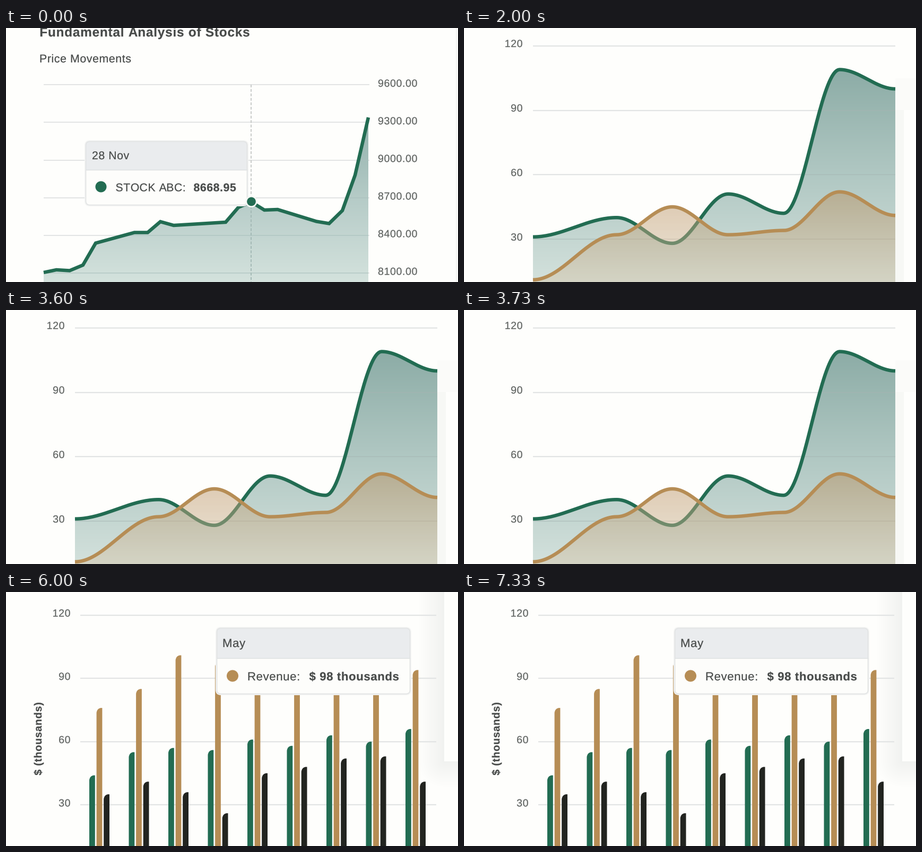
Animation, 852 px wide and 480 px high, one loop 8 s. Source, as a matplotlib script:

```python
import matplotlib.pyplot as plt
import numpy as np
from matplotlib.animation import FuncAnimation
from matplotlib.colors import to_rgba
from matplotlib.patches import Circle, FancyBboxPatch, PathPatch, Polygon, Rectangle
from matplotlib.path import Path
from matplotlib.textpath import TextPath

W, H = 852, 480
PT = 0.72  # points per pixel at 100 dpi
SCENE_MS, STEP_MS = 2000, 100

BG, GRID, HEAD, EDGE = "#fefefc", "#e2e4e4", "#eaecee", "#e1e3e3"
GREEN, BROWN, BLACK, BAR = "#226c52", "#b68d55", "#222420", "#43846a"
INK, LABEL = "#484b4a", "#606462"

fig = plt.figure(figsize=(W / 100, H / 100), dpi=100, facecolor=BG)


def stage():
    ax = fig.add_axes([0, 0, 1, 1])
    ax.set(xlim=(0, W), ylim=(H, 0))
    ax.set_autoscale_on(False)
    ax.axis("off")
    return ax


def rect(ax, x0, y0, x1, y1, color, z=1):
    ax.add_patch(Rectangle((x0, y0), x1 - x0, y1 - y0, fc=color, lw=0, zorder=z))


def dot(ax, x, y, r, color, z=9):
    ax.add_patch(Circle((x, y), r, fc=color, lw=0, zorder=z))


def line(ax, xs, ys, color, width, z=1, **kw):
    return ax.plot(xs, ys, color=color, lw=width * PT, zorder=z,
                   solid_capstyle="butt", **kw)[0]


def text(ax, x, y, s, size, color=INK, bold=False, right=False, up=False,
         track=0.6, z=10):
    """Letter-spaced text as outlines, anchored on its baseline."""
    prop = dict(family="Liberation Sans", weight="bold" if bold else "normal")

    def end(t):
        return TextPath((0, 0), t + "|", size=size, prop=prop).get_extents().x1

    zero = end("")
    if right:
        x -= end(s) - zero + track * (len(s) - 1)
    verts, codes = [], []
    for i, ch in enumerate(s):
        if ch == " ":
            continue
        glyph = TextPath((0, 0), ch, size=size, prop=prop)
        verts.append(glyph.vertices + [end(s[:i]) - zero + track * i, 0])
        codes.append(glyph.codes)
    v = np.concatenate(verts)
    if up:
        v = np.column_stack([x - v[:, 1], y - v[:, 0]])
    else:
        v = np.column_stack([x + v[:, 0], y - v[:, 1]])
    # a hairline gives the weight of hinted screen type
    ax.add_patch(PathPatch(Path(v, np.concatenate(codes)), fc=color, ec=color,
                           lw=0.25 * PT, zorder=z))


def clip_shape(ax, verts):
    return Polygon(verts, closed=True, transform=ax.transData)


def gradient(ax, verts, stops, z):
    """Fill a polygon with a vertical gradient; stops are (y, colour)."""
    ys = [y for y, _ in stops]
    rgba = np.array([to_rgba(c) for _, c in stops])
    rows = np.arange(H) + 0.5
    col = np.stack([np.interp(rows, ys, rgba[:, k]) for k in range(4)], axis=1)
    im = ax.imshow(col[:, None, :], extent=(0, W, H, 0), aspect="auto",
                   interpolation="nearest", zorder=z)
    im.set_clip_path(clip_shape(ax, verts))


def area(xs, ys):
    return np.column_stack([np.r_[xs, xs[-1], xs[0]], np.r_[ys, H + 9, H + 9]])


def tooltip(ax, x0, y0, x1, y1, split, title, name, value, color,
            size, xs, bases, spot):
    def box(grow, fc, ec, lw, z, alpha=None):
        patch = FancyBboxPatch((x0 + 8, y0 + 8), x1 - x0 - 16, y1 - y0 - 16,
                               boxstyle=f"round,pad={8 + grow}", fc=fc, ec=ec,
                               lw=lw * PT, zorder=z, alpha=alpha)
        return ax.add_patch(patch)

    box(2, "#f3f4f3", "none", 0, 6)
    body = box(0, BG, "none", 0, 6.1, 0.96)
    top = Rectangle((x0, y0), x1 - x0, split - y0, fc=HEAD, lw=0, zorder=6.2)
    ax.add_patch(top)
    top.set_clip_path(body)
    line(ax, [x0, x1], [split, split], "#dcdfe0", 1.3, 6.3)
    box(-0.5, "none", EDGE, 1.6, 6.4)
    text(ax, xs[0], bases[0], title, size)
    dot(ax, *spot, color)
    text(ax, xs[1], bases[1], name, size)
    text(ax, xs[2], bases[1], value, size, bold=True)


def price_scene():
    ax = stage()
    text(ax, 63.3, 16, "Fundamental Analysis of Stocks", 24.3, bold=True, track=0.8)
    text(ax, 63, 65, "Price Movements", 21.3)
    rect(ax, 847.5, 0, 849.5, H, "#f3f4f2")

    pts = [(71, 462), (95, 457), (120, 458.5), (145, 448), (169, 406.5),
           (242, 386.5), (267, 386.5), (291, 366), (316, 373), (414, 367),
           (438, 339), (462, 328.5), (487, 344), (512, 343), (585, 365.5),
           (609, 369.5), (634, 345), (658, 278), (683, 169)]
    xs, ys = np.array(pts).T
    fill = area(xs, ys)
    gradient(ax, fill, [(168, "#90b0ab"), (320, "#b5cbc7"), (480, "#d4e2dd")], 2)
    for i in range(6):
        y = 107 + 71.25 * i
        line(ax, [71, 685], [y, y], GRID, 2)
        inner = line(ax, [71, 683], [y, y], "#a9bfbc", 1.8, 3, alpha=0.6)
        inner.set_clip_path(clip_shape(ax, fill))
        text(ax, 701, 111 + 71.1 * i, f"{9600 - 300 * i}.00", 19.6, LABEL)
    dash = dict(dashes=(2.6, 1.6), dash_capstyle="butt")
    line(ax, [461.5, 461.5], [107, 328], "#c8cbc8", 2, 1, **dash)
    line(ax, [461.5, 461.5], [328, H], "#a3b9b5", 2, 3, **dash)
    line(ax, xs, ys, GREEN, 6.5, 4, solid_joinstyle="miter")

    tooltip(ax, 150, 214, 455, 335, 268, "28 Nov", "STOCK ABC:", "8668.95",
            GREEN, 21.2, (162, 206.5, 353.5), (248, 308.5), (179, 300, 10.5))
    dot(ax, 462.5, 328, 11, "#f6f8f5")
    dot(ax, 462.5, 328, 8.3, GREEN)
    return ax


def smooth(xs, ys, n=40):
    """Cubic segments with level handles 35 % of each step long."""
    t = np.linspace(0, 1, n)
    b = [(1 - t) ** 3, 3 * t * (1 - t) ** 2, 3 * t * t * (1 - t), t ** 3]
    px, py = [], []
    for x0, y0, x1, y1 in zip(xs, ys, xs[1:], ys[1:]):
        h = 0.35 * (x1 - x0)
        px.append(x0 * b[0] + (x0 + h) * b[1] + (x1 - h) * b[2] + x1 * b[3])
        py.append(y0 * (b[0] + b[1]) + y1 * (b[2] + b[3]))
    return np.concatenate(px), np.concatenate(py)


def area_scene():
    ax = stage()
    rect(ax, 813, 155, 829, H, "#f7f8f5")
    rect(ax, 813, 95, 851, 155, "#fbfbf9")
    xs = 130 + 683 / 6.5 * np.array([0, 1.5, 2.5, 3.5, 4.5, 5.5, 6.5])

    def curve(values):
        return smooth(xs, 34 + (120 - np.array(values)) * 121.6 / 30)

    gx, gy = curve([31, 40, 28, 51, 42, 109, 100])
    bx, by = curve([11, 32, 45, 32, 34, 52, 41])
    g_area, b_area = area(gx, gy), area(bx, by)

    for i in range(4):
        y = 34 + 121.6 * i
        line(ax, [130, 813], [y, y], GRID, 2.2)
        inner = line(ax, [130, 813], [y, y], "#a5b5b2", 1.6, 2.5, alpha=0.6)
        inner.set_clip_path(clip_shape(ax, g_area))
        text(ax, 110.5, 36 + 121.9 * i, str(120 - 30 * i), 19.6, LABEL, right=True)

    gradient(ax, g_area, [(78, "#8caca6"), (280, "#b1c8c3"), (480, "#d3e1dc")], 2)
    line(ax, gx, gy, GREEN, 6.5, 3)
    gradient(ax, b_area, [(308, (0.73, 0.57, 0.38, 0.5)),
                          (480, (0.84, 0.77, 0.66, 0.45))], 4)
    line(ax, bx, by, BROWN, 6.5, 5)
    return ax


def country_scene():
    ax = stage()
    rows = [("South Korea", 400), ("Canada", 430), ("United Kingdom", 448),
            ("Netherlands", 470), ("Italy", 540), ("France", 580),
            ("Japan", 690), ("United States", 1100), ("China", 1200)]
    for i, (name, value) in enumerate(rows):
        y = 57.3 + 50.85 * i
        line(ax, [234, 773], [y, y], GRID, 2)
        rect(ax, 235.5, y + 7.4, 235.5 + value * 0.3577, y + 43.3, BAR, 3)
        text(ax, 207, y + 27.1, name, 20, LABEL, right=True, track=0.7)
    line(ax, [234.5, 234.5], [56, H], GRID, 2)
    return ax


def card_shadow(ax):
    x, y = np.meshgrid(np.arange(W) + 0.5, np.arange(H) + 0.5)
    d = np.hypot(np.clip(826 - x, 0, None), np.clip(y - 320, 0, None))
    rgba = np.zeros((H, W, 4))
    rgba[..., :3] = to_rgba("#e4e6e4")[:3]
    rgba[..., 3] = np.where(d > 0, 0.5 * np.clip(1 - d / 48, 0, 1), 0)
    ax.imshow(rgba, extent=(0, W, H, 0), aspect="auto", zorder=0.5)


def column(ax, x, top, color):
    """Bar running off the stage, rounded on its upper left."""
    x1 = x + 10.8
    verts = [(x, H + 9), (x, top + 9), (x + 1, top + 1), (x + 8, top),
             (x1, top), (x1, H + 9), (x, H + 9)]
    codes = [Path.MOVETO, Path.LINETO, Path.CURVE3, Path.CURVE3,
             Path.LINETO, Path.LINETO, Path.CLOSEPOLY]
    ax.add_patch(PathPatch(Path(verts, codes), fc=color, lw=0, zorder=3))


def revenue_scene():
    ax = stage()
    card_shadow(ax)
    for i in range(4):
        y = 44 + 119.4 * i
        line(ax, [140, 811], [y, y], GRID, 2.2)
        text(ax, 121.5, 46.5 + 119.6 * i, str(120 - 30 * i), 19.6, LABEL, right=True)
    text(ax, 67, 346.5, "$ (thousands)", 19.8, bold=True, up=True, track=0.7)

    series = [([44, 55, 57, 56, 61, 58, 63, 60, 66], GREEN),
              ([76, 85, 101, 98, 87, 105, 91, 114, 94], BROWN),
              ([35, 41, 36, 26, 45, 48, 52, 53, 41], BLACK)]
    for k, (values, color) in enumerate(series):
        for i, v in enumerate(values):
            column(ax, 157 + 13.6 * k + 74.5 * i, 44 + (120 - v) * 3.98, color)

    tooltip(ax, 397, 68, 762, 193, 125, "May", "Revenue:", "$ 98 thousands",
            BROWN, 22.2, (408, 455, 571.5), (104, 167), (427, 158.5, 11))
    return ax


scenes = [price_scene(), area_scene(), country_scene(), revenue_scene()]


def show(frame):
    current = frame * STEP_MS // SCENE_MS
    for i, ax in enumerate(scenes):
        ax.set_visible(i == current)
    return scenes


anim = FuncAnimation(fig, show, frames=len(scenes) * SCENE_MS // STEP_MS,
                     interval=STEP_MS, repeat=True, blit=False)
plt.show()
```
